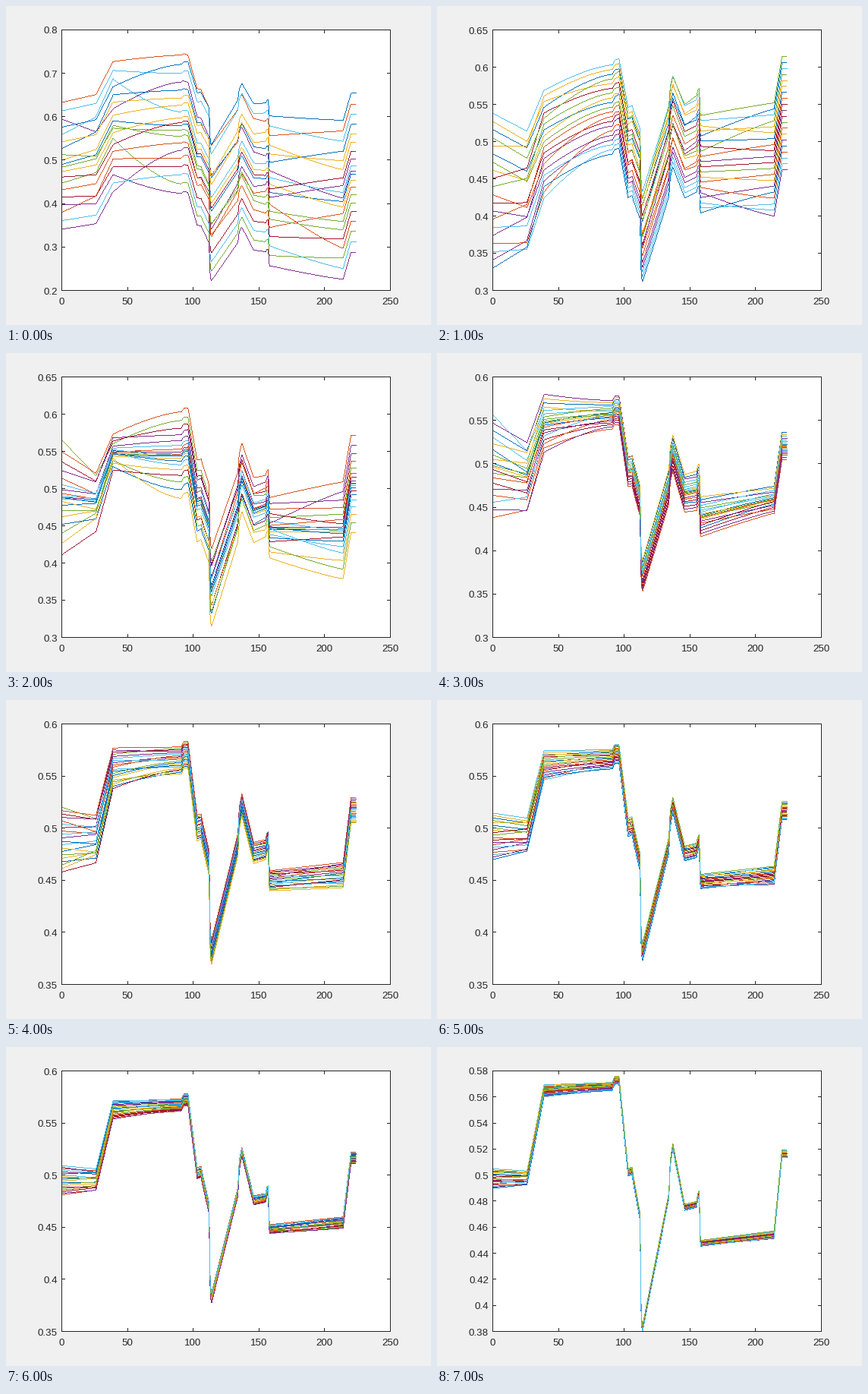
Recreate the animation shown at these times as a matplotlib script. Size 560 by 420 pixels, loop 8000 ms.

```python
import numpy as np
import matplotlib.pyplot as plt
from matplotlib.animation import FuncAnimation
from matplotlib.colors import to_rgba
from matplotlib.patches import Rectangle

W, H, DPI = 560, 420, 100
PX = 72 / DPI                          # one pixel in points
LEFT, RIGHT, TOP, BOTTOM = 73, 506, 31, 374
TICK = 4
INK = "#262626"
COLORS = ["#0072BD", "#D95319", "#EDB120", "#7E2F8E",
          "#77AC30", "#4DBEEE", "#A2142F"]
COUNT = 20

# Profile that all curves settle on, in thousandths
X = np.arange(225)
KNOT_X = [0, 26, 39, 91, 92, 93, 96, 103, 106, 107, 112, 113, 114,
          134, 135, 137, 146, 155, 156, 157, 158, 214, 220, 224]
KNOT_Y = [500, 500, 567, 569, 572, 574, 574, 503, 504, 497, 469, 389, 383,
          484, 509, 522, 475, 477, 483, 485, 447, 454, 516, 516]
BASE = np.interp(X, KNOT_X, KNOT_Y)

# Where the curves change rank, and how they ease out to the next place
ANCHORS = [0, 39, 91, 158, 214]
BENDS = [1, 1.5, 1, 1.15]
STRIDE = 9                             # rank step between neighbours
MIX = 2.5                              # how far ranks wander, in places


def ease_between(offset):
    """Offset at every X from the offsets at the anchors."""
    shift = np.full(X.size, offset[-1])
    for k, bend in enumerate(BENDS):
        a, b = ANCHORS[k], ANCHORS[k + 1]
        u = (X[a:b] - a) / (b - a)
        shift[a:b] = offset[k] + (offset[k + 1] - offset[k]) * (1 - (1 - u) ** bend)
    return shift


def scene(ylim, step, low, high, top, tail=1.0, scale=1.0):
    """Curves fanned out around the profile, with curve `top` uppermost at
    the left; a larger `tail` gathers them near the middle."""
    rng = np.random.default_rng(top)
    low, high = scale * np.array(low), scale * np.array(high)
    rank = (COUNT - 1 + STRIDE * (np.arange(COUNT) - top)) % COUNT
    offsets = np.empty((COUNT, len(ANCHORS)))
    for k, (lo, hi) in enumerate(zip(low, high)):
        if k:
            rank = np.argsort(np.argsort(rank + rng.normal(0, MIX, COUNT)))
        q = 2 * rank / (COUNT - 1) - 1
        level = np.sign(q) * np.abs(q) ** tail
        offsets[:, k] = (lo + hi) / 2 + (hi - lo) / 2 * level
    curves = [(BASE + ease_between(row)) / 1000 for row in offsets]
    ticks = np.arange(ylim[0], ylim[1] + step / 2, step)
    return ylim, ticks, curves


def settled(ylim, step, scale, top):
    """Late scenes share one narrow fan that keeps shrinking."""
    return scene(ylim, step, (-42, -29, -17, -7, -11), (20, 10, 9, 12, 13),
                 top, scale=scale)


SCENES = [
    scene((0.2, 0.8), 0.1, (-159, -140, -145, -190, -228),
          (133, 160, 173, 155, 138), top=1, tail=1.3),
    scene((0.3, 0.65), 0.05, (-170, -143, -86, -43, -54),
          (38, 2, 34, 88, 98), top=5),
    scene((0.3, 0.65), 0.05, (-89, -42, -82, -40, -75),
          (65, 6, 34, 41, 55), top=4, tail=2),
    scene((0.3, 0.6), 0.05, (-62, -54, -29, -31, -11),
          (56, 13, 4, 15, 20), top=12, tail=1.5),
    settled((0.35, 0.6), 0.05, 1, top=4),
    settled((0.35, 0.6), 0.05, 0.72, top=5),
    settled((0.35, 0.6), 0.05, 0.45, top=19),
    settled((0.38, 0.58), 0.02, 0.24, top=5),
]

fig = plt.figure(figsize=(W / DPI, H / DPI), dpi=DPI, facecolor="#F0F0F0")
ax = fig.add_axes([0, 0, 1, 1])
ax.axis("off")
FONT = dict(family="Liberation Sans", size=13.33 * PX, color=INK)

plot_area = ax.add_patch(Rectangle((LEFT, TOP), RIGHT - LEFT, BOTTOM - TOP,
                                   fc="white", ec="none", zorder=0))
canvas = ax.imshow(np.zeros((H, W, 4)), extent=(0, W, H, 0), aspect="auto",
                   interpolation="nearest", zorder=2)
canvas.set_clip_path(plot_area)
ax.set(xlim=(0, W), ylim=(H, 0))


def rule(xs=(), ys=()):
    """Dark one-pixel axis stroke."""
    return ax.plot(xs, ys, color=INK, lw=PX, aa=False, zorder=5, snap=True,
                   solid_capstyle="butt")[0]


def trace(x, y):
    """Pixels of a hard-edged stroke, one step along the longer axis each."""
    steps = np.maximum(np.abs(np.diff(x)), np.abs(np.diff(y)))
    t = np.concatenate([[0], np.cumsum(steps)])
    s = np.arange(t[-1])
    return [np.rint(np.interp(s, t, v)).astype(int) for v in (x, y)]


rule([LEFT, RIGHT, RIGHT, LEFT, LEFT], [TOP, TOP, BOTTOM, BOTTOM, TOP])

curve_x = LEFT + X / 250 * (RIGHT - LEFT)
for value in range(0, 251, 50):
    x = LEFT + value / 250 * (RIGHT - LEFT)
    rule([x, x], [BOTTOM, BOTTOM - TICK])
    rule([x, x], [TOP, TOP + TICK])
    ax.text(x, 393, str(value), ha="center", va="baseline", **FONT)

most = max(len(ticks) for _, ticks, _ in SCENES)
marks = [(rule(), rule(),
          ax.text(68, 0, "", ha="right", va="baseline", **FONT))
         for _ in range(most)]


def update(frame):
    (lo, hi), ticks, curves = SCENES[frame]

    def to_y(v):
        return BOTTOM - (v - lo) / (hi - lo) * (BOTTOM - TOP)

    pixels = np.zeros((H, W, 4))
    for i, curve in enumerate(curves):
        px, py = trace(curve_x, to_y(curve))
        pixels[py, px] = to_rgba(COLORS[i % len(COLORS)])
    canvas.set_data(pixels)

    for k, (left, right, label) in enumerate(marks):
        shown = k < len(ticks)
        for artist in (left, right, label):
            artist.set_visible(shown)
        if shown:
            y = to_y(ticks[k])
            left.set_data([LEFT, LEFT + TICK], [y, y])
            right.set_data([RIGHT - TICK, RIGHT], [y, y])
            label.set_text(f"{ticks[k]:.3g}")
            label.set_y(y + 5.5)
    return [canvas]


anim = FuncAnimation(fig, update, frames=len(SCENES), interval=1000,
                     repeat=True, repeat_delay=0, blit=False)
plt.show()
```
